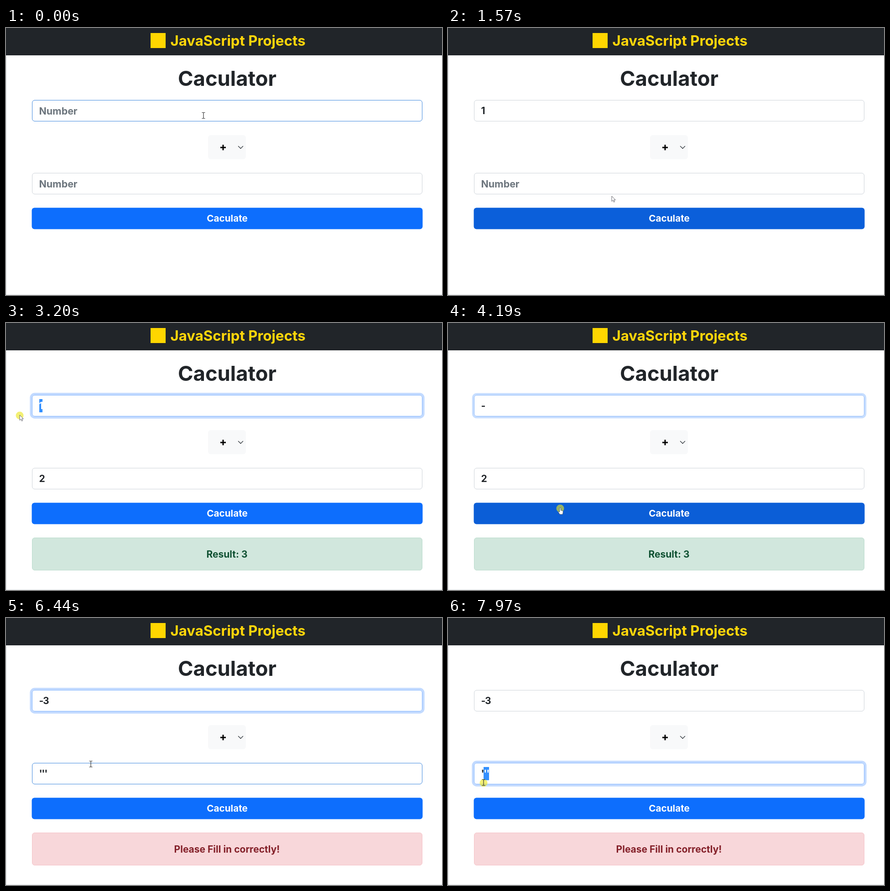
An HTML page for the animation above (8 s loop, 956 px wide and 586 px high).

```html
<!DOCTYPE html>
<html lang="en">
<head>
<meta charset="utf-8">
<title>Caculator</title>
<style>
html, body { margin: 0; width: 100%; height: 100%; overflow: hidden; background: #fff; }
body { position: relative; font: 700 21px Inter, "Open Sans", sans-serif; color: #212529; }
body * { box-sizing: border-box; }
.at { position: absolute; display: flex; align-items: center; justify-content: center; white-space: pre; }
#page { left: 0; top: 60px; width: 956px; height: 526px; border: solid #dee2e6; border-width: 0 0 1px 1px; }
#bar { left: 0; top: 0; width: 956px; height: 60px; background: #212529; }
#logo { left: 317px; top: 11px; width: 33px; height: 33px; background: #ffd600; }
#brand { left: 360.5px; top: 7.5px; height: 40px; font-size: 31.2px; color: #ffd60a; }
h1 { left: 57px; top: 80px; width: 856px; height: 61px; margin: 0; font-size: 45.4px; }
.row { left: 56.5px; width: 856px; height: 47px; border-radius: 6px; }
.field { border: 1px solid; justify-content: flex-start; padding-left: 15px; letter-spacing: -.06em; }
#a { top: 158px; }
#b { top: 318px; }
#go { left: 56px; top: 394px; width: 857px; transform: translate(.5px, .4px); color: #fff; font-size: 20.7px; }
#out { top: 471px; height: 72px; border: 1px solid; }
#out.good { color: #0f5132; background: #d1e7dd; border-color: #badbcc; }
#out.bad { color: #842029; background: #f8d7da; border-color: #f5c2c7; }
#op { left: 443px; top: 235px; width: 83px; height: 53px; border-radius: 6px; background: #f8f9fa; }
.hint { color: #6c757d; font-size: 21.4px; letter-spacing: 0; }
.picked { color: #fff; background: #3390ff; padding: 2px 0; }
.caret { width: 1px; height: 25px; background: #212529; }
#mouse { position: absolute; left: 0; top: 0; overflow: visible; }
</style>
</head>
<body>
<div id="page" class="at"></div>
<div id="bar" class="at"></div>
<div id="logo" class="at"></div>
<div id="brand" class="at">JavaScript Projects</div>
<h1 class="at">Caculator</h1>
<div id="a" class="at row field"></div>
<div id="op" class="at">
  <svg width="83" height="53" fill="none">
    <path d="M27 27.2h12M33 21.2v12" stroke="#000" stroke-width="3"/>
    <path d="M66.5 24.5l5 5 5-5" stroke="#343a40" stroke-width="1.4" stroke-linecap="round" stroke-linejoin="round"/>
  </svg>
</div>
<div id="b" class="at row field"></div>
<div id="go" class="at row">Caculate</div>
<div id="out" class="at row"></div>
<svg id="mouse" width="1" height="1">
  <circle id="press" r="8.5" cy="1" fill="#ebe61e" fill-opacity=".62"/>
  <path id="arrow" d="M0 0V11.5L2.7 9 4.6 13.2 6.5 12.3 4.7 8.3H8.2Z" fill="#fff" stroke="#56565f" stroke-width=".9"/>
  <path id="beam" d="M-3.5-6.5H-1L0-5.8 1-6.5H3.5M0-5.8V5.8M-3.5 6.5H-1L0 5.8 1 6.5H3.5" fill="none" stroke="#333" stroke-width="1.2"/>
  <path id="hand" d="M-1.2 0Q0-1.4 1.2 0V5L5 6Q6.6 6.5 6.4 8L5.5 14H-.8L-4 9.2Q-4.4 7.6-3 7.8L-1.2 9Z" fill="#fff" stroke="#3a4a5a" stroke-width=".8"/>
</svg>
<script>
const LOOP = 8000, GLIDE = 300, FADE = 150, STEPS = 12, CLICK = 55, KEY_GAP = 70, SOLVE_DELAY = 55;
const $ = id => document.getElementById(id);
const clamp = (v, lo, hi) => Math.max(lo, Math.min(hi, v));

// The pointer reaches each stop at a time, after a glide
const stop = (time, x, y, glide = GLIDE) => ({ time, x, y, glide });
const stops = [
  stop(0, 433, 192), stop(470, 427, 209, 150), stop(1090, 359, 369),
  stop(1400, 358, 402, 60), stop(1570, 359, 369, 15), stop(1640, 353, 337),
  stop(1970, 307, 405, 150), stop(2380, 295, 260), stop(2975, 103, 184),
  stop(3200, 30, 202), stop(4030, 246, 406), stop(4770, 98, 350),
  stop(4915, 98, 369, 95), stop(5060, 72, 371), stop(5480, 190, 190),
  stop(6285, 186, 320.5), stop(6850, 190, 412), stop(7640, 92, 350), stop(7965, 78, 361)
];

const press = (time, hold = CLICK) => ({ time, until: time + hold });
const type = (time, keys) => [...keys].map((key, i) => ({ time: time + i * KEY_GAP, key }));
const events = [
  press(20), ...type(340, "1"), press(880),
  press(1650), ...type(1780, "2"), press(1985),
  press(3000, 230), ...type(3560, "-"), press(4185),
  press(4810, 270), ...type(5200, "'''"),
  press(5490), ...type(5800, "3"), press(7000), press(7650, 350)
];

function pointer(t) {
  const next = stops.findIndex(s => s.time > t);
  if (next < 1) return next ? stops[stops.length - 1] : stops[0];
  const from = stops[next - 1], to = stops[next];
  const span = Math.min(to.glide, to.time - from.time);
  const k = clamp((t - to.time + span) / span, 0, 1), e = k * k * (3 - 2 * k);
  return { x: from.x + (to.x - from.x) * e, y: from.y + (to.y - from.y) * e };
}

// Which control lies under the pointer
function over(t) {
  const { x, y } = pointer(t), tops = { a: 158, b: 318, go: 394 };
  if (x < 57 || x > 913) return "";
  return Object.keys(tops).find(id => y >= tops[id] && y <= tops[id] + 47) || "";
}

// A drag selects from the end of the word back to the pointer
function dragged(word, t) {
  const left = 72, step = 5.2;
  return clamp(Math.round((left - pointer(t).x) / step + word.length), 0, word.length);
}

function solve(a, b) {
  const sum = Number(a) + Number(b);
  return Number.isNaN(sum) ? "Please Fill in correctly!" : "Result: " + sum;
}

// Replays the session up to a time
function stateAt(t) {
  const s = { a: "", b: "", focus: "", since: 0, picked: 0, down: false, answer: "" };
  for (const e of events.filter(e => e.time <= t)) {
    if (e.key) {
      const word = s[s.focus];
      s[s.focus] = word.slice(0, word.length - s.picked) + e.key;
      s.picked = 0;
    } else {
      s.focus = over(e.time);
      s.since = e.time;
      s.down = t < e.until;
      s.picked = dragged(s[s.focus] || "", Math.min(t, e.until));
      if (s.focus === "go") s.answer = solve(s.a, s.b);
    }
  }
  return s;
}

// Share of the last FADE ms for which a test held
function eased(test, past) {
  return past.filter(test).length / past.length;
}

const blend = (from, to, k) => from.map((c, i) => c + (to[i] - c) * k);
const rgb = c => `rgb(${c.map(Math.round)})`;
const glow = (color, alpha, k) => `0 0 0 ${4.65 * k}px rgba(${color},${alpha * k})`;

function put(el, html) {
  if (el.shown !== html) el.innerHTML = el.shown = html;
}

function drawField(id, t, now, past) {
  const el = $(id), word = now[id], active = now.focus === id;
  const ring = eased(p => p.focus === id, past);
  const rim = blend([206, 212, 218], [65, 137, 222], eased(p => p.over === id, past));
  el.style.borderColor = rgb(blend(rim, [134, 183, 254], ring));
  el.style.boxShadow = glow("13,110,253", .25, ring);
  const cut = word.length - (active ? now.picked : 0);
  const blink = active && cut === word.length && (t - now.since) % 600 < 300;
  const caret = blink ? '<i class="caret"></i>' : "";
  const body = word.slice(0, cut) + `<span class="picked">${word.slice(cut)}</span>`;
  put(el, word ? body + caret : caret + '<span class="hint">Number</span>');
}

function drawButton(past) {
  const dark = eased(p => p.over === "go" || p.focus === "go", past);
  $("go").style.background = rgb(blend([13, 110, 253], [11, 94, 215], dark));
  $("go").style.boxShadow = glow("49,132,253", .5, eased(p => p.focus === "go", past));
}

function drawResult(answer) {
  const out = $("out");
  out.className = "at row " + (answer.startsWith("Result") ? "good" : "bad");
  out.style.display = answer ? "" : "none";
  put(out, answer);
}

function drawMouse(t, down) {
  const { x, y } = pointer(t), spot = over(t);
  const shape = spot === "go" ? "hand" : spot ? "beam" : "arrow";
  for (const id of ["arrow", "beam", "hand"]) $(id).style.display = id === shape ? "" : "none";
  $("press").style.display = down ? "" : "none";
  $("mouse").style.transform = `translate(${x}px, ${y}px)`;
}

function draw() {
  const t = performance.now() % LOOP, now = stateAt(t);
  const past = Array.from({ length: STEPS }, (_, i) => {
    const then = t - FADE * i / STEPS;
    return { focus: stateAt(then).focus, over: over(then) };
  });
  drawField("a", t, now, past);
  drawField("b", t, now, past);
  drawButton(past);
  drawResult(stateAt(t - SOLVE_DELAY).answer);
  drawMouse(t, now.down);
  requestAnimationFrame(draw);
}
draw();
</script>
</body>
</html>
```
